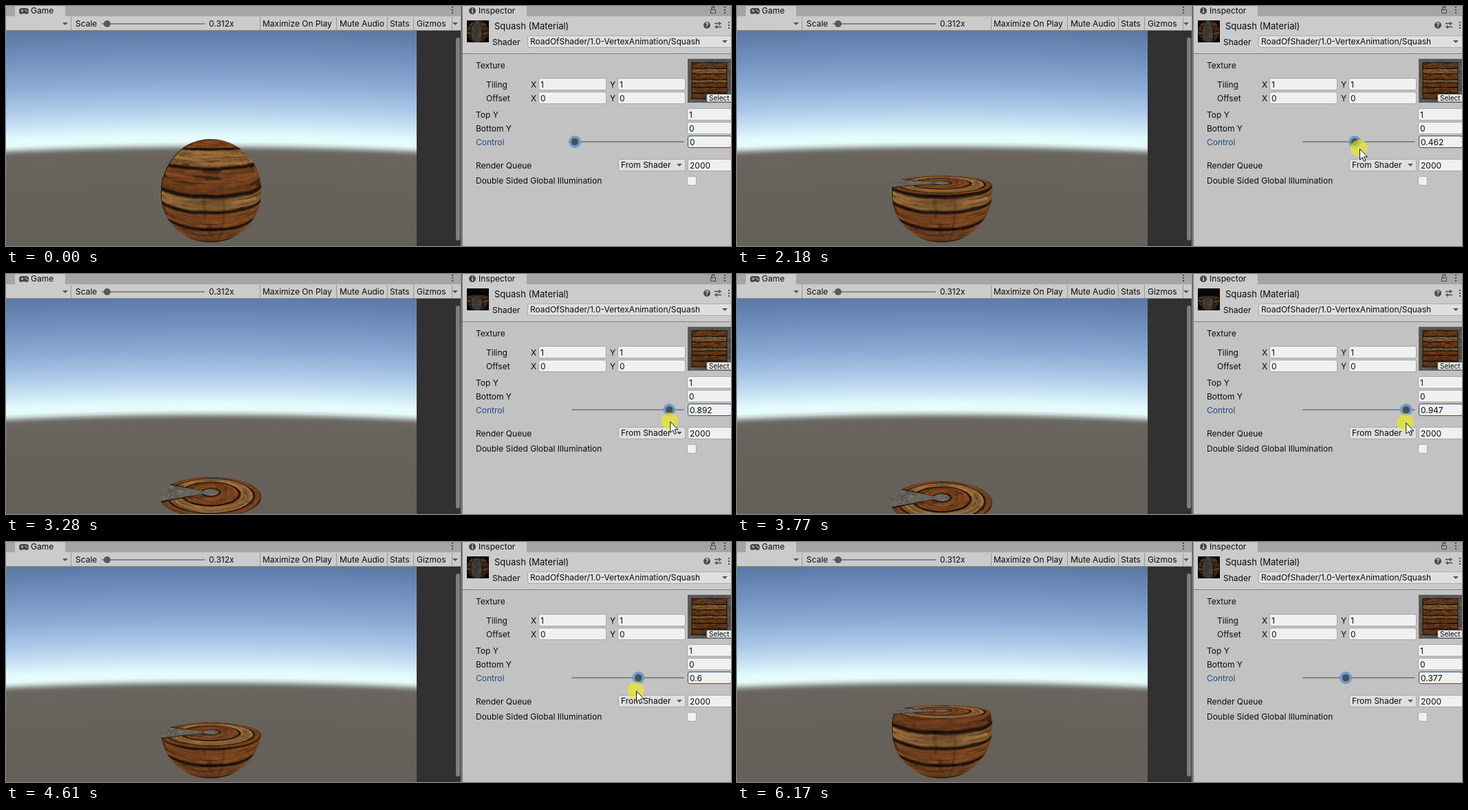
An HTML page with a canvas that plays this animation: 1054 by 350 pixels, repeating every 6950 ms.

```html
<!DOCTYPE html>
<html lang="en">
<head>
<meta charset="utf-8">
<title>Squash material</title>
<style>
html, body { margin: 0; width: 100%; height: 100%; overflow: hidden; background: #c8c8c8; }
canvas, svg { position: absolute; left: 0; top: 0; width: 1054px; height: 350px; display: block; }
text { font: 12px Inter, sans-serif; fill: #0b0b0b; white-space: pre; }
</style>
</head>
<body>
<canvas id="scene" width="1054" height="350"></canvas>
<svg id="ui" viewBox="0 0 1054 350" xmlns="http://www.w3.org/2000/svg"></svg>
<script>
const LOOP = 6950;
const ctx = document.getElementById('scene').getContext('2d');

// ---------- timing ----------
// [first change, last change, number of steps]
const bursts = [[370, 1010, 9], [1090, 1250, 3], [1410, 1410, 1], [1560, 2180, 9], [2260, 2900, 9],
  [2970, 3610, 9], [3680, 3840, 3], [3990, 4610, 9], [4690, 5080, 6], [5620, 6170, 8]];
const controlKeys = [[1560, 0], [1640, .02], [1720, .065], [2180, .462], [2260, .508], [2900, .81],
  [3280, .91], [3610, .94], [3840, .95], [3990, .942], [4140, .88], [4300, .761], [4380, .669],
  [4610, .6], [5080, .377]];
const pointerKeys = [[370, 986, 338], [690, 889, 252], [1010, 837, 203], [1250, 827, 196],
  [1410, 827, 196], [1560, 831, 197], [1640, 837, 199], [2180, 905, 208], [2900, 954, 213],
  [3280, 968, 215.5], [3840, 973, 217], [3990, 966, 218], [4300, 930, 219], [4610, 916, 217],
  [5080, 885.5, 212], [5540, 885.5, 212], [5620, 889, 218], [6090, 984, 338]];

function heldTime(t) {
  let held = 0;
  for (const [start, end, n] of bursts) {
    if (t < start) break;
    const step = n > 1 ? (end - start) / (n - 1) : 1;
    held = start + Math.min(n - 1, Math.floor((t - start) / step + 1e-6)) * step;
  }
  return held;
}

function track(keys, t) {
  if (t <= keys[0][0]) return keys[0].slice(1);
  for (let i = 1; i < keys.length; i++) {
    const a = keys[i - 1], b = keys[i];
    if (t <= b[0]) {
      const k = (t - a[0]) / (b[0] - a[0]);
      return a.slice(1).map((v, j) => v + (b[j + 1] - v) * k);
    }
  }
  return keys[keys.length - 1].slice(1);
}

// ---------- wood texture ----------
const TW = 512, TH = 256;
const texture = new Float32Array(TW * TH * 3);
const hash = (x, y) => {
  const s = Math.sin(x * 127.1 + y * 311.7) * 43758.5453;
  return s - Math.floor(s);
};
function noise(x, y) {
  const i = Math.floor(x), j = Math.floor(y);
  const smooth = f => f * f * (3 - 2 * f);
  const a = smooth(x - i), b = smooth(y - j);
  return (hash(i, j) * (1 - a) + hash(i + 1, j) * a) * (1 - b)
    + (hash(i, j + 1) * (1 - a) + hash(i + 1, j + 1) * a) * b;
}
const grooves = [.94, .797, .667, .527, .447, .34, .2, .06];
const red = [118, 66, 31], tan = [142, 99, 54], brown = [106, 62, 31];
const planks = [red, tan, red, tan, red, brown, brown];

function woodColor(u, v) {
  const side = Math.min(u, 1 - u), cap = Math.min(v, 1 - v);
  const grit = noise(u * 90, v * 60);
  if (side < .068 || cap < .055) {
    const g = .72 + .5 * noise(u * 22, v * 14) * grit + .2 * grit;
    return [112 * g, 106 * g, 97 * g];
  }
  if (side < .078 || cap < .063) return [30, 22, 15];
  const w = v + .012 * (noise(u * 9, 3) - .5) + .005 * (noise(u * 30, v * 8) - .5);
  let p = 0, gap = 1;
  grooves.forEach((g, i) => {
    if (w < g && i < planks.length) p = i;
    gap = Math.min(gap, Math.abs(w - g));
  });
  const fine = noise(u * 26, w * 170), wide = noise(u * 8 + 5, w * 55 + p);
  let k = .66 + .38 * wide + .3 * fine + .14 * (grit - .5);
  if (noise(u * 12 + 40, w * 90) < .2) k *= .62;
  if (noise(u * 60, w * 6) < .13) k *= .85;
  const edge = Math.min(1, Math.max(0, (gap - .004) / .012));
  k *= .24 + .76 * edge;
  return planks[p].map(c => c * k);
}
for (let y = 0; y < TH; y++) for (let x = 0; x < TW; x++) {
  const c = woodColor((x + .5) / TW, 1 - (y + .5) / TH);
  texture.set(c, (y * TW + x) * 3);
}

// ---------- squashed sphere, traced per pixel ----------
const EYE = .427, DIST = 2.04, R2 = .25;

function traceBall(view, top, dx, dy) {
  const rad2 = top > 0 ? R2 - top * top : R2;
  let x, y, z, hit = false;
  if (top < .5 && dy < 0 && top < EYE) {
    const t = (top - EYE) / dy;
    x = dx * t; z = t - DIST;
    const r = x * x + z * z;
    if (r <= rad2) { hit = true; y = Math.sqrt(R2 - r); }
  }
  if (!hit) {
    const a = dx * dx + dy * dy + 1, b = EYE * dy - DIST, c = EYE * EYE + DIST * DIST - R2;
    const d = b * b - a * c;
    if (d < 0) return -1;
    const t = (-b - Math.sqrt(d)) / a;
    x = dx * t; y = EYE + dy * t; z = t - DIST;
    if (y > top) return -1;
  }
  let u = (Math.atan2(z, x) - view.seam) / (2 * Math.PI);
  u -= Math.floor(u);
  const v = .5 + Math.asin(Math.max(-1, Math.min(1, y * 2))) / Math.PI;
  return (Math.min(TH - 1, Math.floor((1 - v) * TH)) * TW + Math.min(TW - 1, Math.floor(u * TW))) * 3;
}

function makeView(x, y, w, h, cx, cy, focal, seam, light) {
  const cv = document.createElement('canvas');
  cv.width = w; cv.height = h;
  return { x, y, w, h, cx, cy, focal, seam, light, cv, g: cv.getContext('2d') };
}
const gameView = makeView(220, 190, 156, 160, 297.5, 204.5, 292, Math.PI, 1);
const iconView = makeView(670, 21, 32, 32, 686, 23.5, 61, -Math.PI / 2 - .12, .6);

function drawBall(view, top) {
  const img = view.g.createImageData(view.w, view.h), S = 3;
  for (let py = 0, o = 0; py < view.h; py++) for (let px = 0; px < view.w; px++, o += 4) {
    let r = 0, g = 0, b = 0, n = 0;
    for (let s = 0; s < S * S; s++) {
      const sx = view.x + px + (s % S + .5) / S, sy = view.y + py + (Math.floor(s / S) + .5) / S;
      const i = traceBall(view, top, (sx - view.cx) / view.focal, (view.cy - sy) / view.focal);
      if (i < 0) continue;
      r += texture[i]; g += texture[i + 1]; b += texture[i + 2]; n++;
    }
    if (!n) continue;
    const k = view.light / n;
    img.data[o] = r * k; img.data[o + 1] = g * k; img.data[o + 2] = b * k;
    img.data[o + 3] = 255 * n / (S * S);
  }
  view.g.putImageData(img, 0, 0);
  ctx.drawImage(view.cv, view.x, view.y);
}

// flat view of the texture
const swatch = document.createElement('canvas');
swatch.width = 60; swatch.height = 60;
{
  const g = swatch.getContext('2d'), img = g.createImageData(60, 60);
  for (let y = 0; y < 60; y++) for (let x = 0; x < 60; x++) {
    const i = (Math.floor((y + .5) * TH / 60) * TW + Math.floor((x + .5) * TW / 60)) * 3;
    for (let c = 0; c < 3; c++) img.data[(y * 60 + x) * 4 + c] = texture[i + c] * .84;
    img.data[(y * 60 + x) * 4 + 3] = 255;
  }
  g.putImageData(img, 0, 0);
}

// ---------- backdrop ----------
const ARC = 6430;
const sky = ctx.createRadialGradient(297, 207 + ARC, ARC - 150, 297, 207 + ARC, ARC + 175);
[[-150, '#645f58'], [-60, '#66615a'], [-8, '#69645e'], [-4, '#6f6d69'], [0, '#8f9693'], [4, '#c4d3d2'],
  [9, '#e6fbfa'], [18, '#e4fbfd'], [34, '#cde6f5'], [60, '#acc9e8'], [95, '#8babd5'], [135, '#7190bf'],
  [175, '#5c79a5']].forEach(([d, c]) => sky.addColorStop((d + 150) / 325, c));

function box(x, y, w, h, color) {
  ctx.fillStyle = color;
  ctx.fillRect(x, y, w, h);
}
function paintScene(control) {
  box(0, 0, 1054, 350, '#c8c8c8');
  box(0, 0, 1054, 15, '#a5a5a5');
  box(13, 0, 73, 15, '#cbcbcb');
  box(664, 0, 93, 15, '#cbcbcb');
  box(0, 15, 662, 21, '#cbcbcb');
  box(664, 15, 390, 54, '#cbcbcb');
  box(664, 69, 390, 1, '#7f7f7f');
  box(664, 70, 390, 280, '#c2c2c2');
  box(0, 35, 662, 1, '#8f8f8f');
  box(597, 36, 65, 314, '#313131');
  box(661, 0, 3, 350, '#8a8a8a');
  box(662, 0, 1, 350, '#5e5e5e');
  box(0, 36, 597, 314, sky);
  box(670, 21, 32, 32, '#060606');
  box(991, 77, 63, 64, '#5c5c5c');
  ctx.drawImage(swatch, 992.5, 79);
  const border = 1.007 - .981 * control;
  drawBall(gameView, border - .5);
  drawBall(iconView, border);
}

// ---------- interface ----------
const text = (x, y, s, extra = '') => `<text x="${x}" y="${y}" ${extra}>${s}</text>`;
const rect = (x, y, w, h, fill, extra = '') =>
  `<rect x="${x}" y="${y}" width="${w}" height="${h}" fill="${fill}" ${extra}/>`;
const circle = (x, y, r, fill, extra = '') => `<circle cx="${x}" cy="${y}" r="${r}" fill="${fill}" ${extra}/>`;
const path = (d, extra) => `<path d="${d}" ${extra}/>`;
const field = (x, y, w, s, id = '') =>
  rect(x + .5, y + .5, w - 1, 17, '#f0f0f0', `rx="2.5" stroke="${id ? '#2c4f78' : '#a6a6a6'}"`)
  + text(x + 3, y + 14, s, id && `id="${id}"`);
const drop = (x, y, w, s, arrow) =>
  rect(x + .5, y + .5, w - 1, 17, '#dfdfdf', 'rx="2.5" stroke="#aaa"') + text(x + 4, y + 13, s)
  + triangle(arrow, y + 9);
const triangle = (x, y) => path(`M${x - 4} ${y - 2}h8l-4 4z`, 'fill="#555"');
const dots = (x, y) => [-4, 0, 4].map(d => rect(x - 1, y + d - 1, 2, 2, '#4a4a4a')).join('');
const line = 'fill="none" stroke="#4a4a4a" stroke-width="1.4"';

document.getElementById('ui').innerHTML = [
  // game tab and toolbar
  rect(19, 3, 14, 8, '#454545', 'rx="4"'), circle(22, 9.2, 2.6, '#454545'), circle(30, 9.2, 2.6, '#454545'),
  path('M21.5 7h4M23.5 5v4', 'stroke="#cbcbcb" stroke-width="1.1"'),
  circle(28.5, 6, .9, '#cbcbcb'), circle(30.5, 8, .9, '#cbcbcb'),
  text(36, 11, 'Game'), dots(649, 6),
  [94, 369, 480, 554, 592, 648].map(x => rect(x, 16, 1, 19, '#999')).join(''),
  triangle(86, 26), triangle(653, 26),
  text(101, 30, 'Scale'), rect(139, 25, 150, 2, '#868686'), circle(147, 26, 5, '#585858'),
  '<clipPath id="cut"><rect x="290" y="16" width="41" height="19"/></clipPath>',
  text(295, 30, '0.312x', 'clip-path="url(#cut)"'),
  text(373, 30, 'Maximize On Play'), text(485, 30, 'Mute Audio'), text(558, 30, 'Stats'), text(597, 30, 'Gizmos'),
  rect(654, 46, 6, 296, '#7d7d7d', 'rx="3"'),
  // inspector header
  circle(678, 7, 5, '#454545'), rect(677.3, 6, 1.6, 4, '#ddd'), rect(677.3, 3.6, 1.6, 1.5, '#ddd'),
  text(687, 11, 'Inspector'),
  rect(1024.5, 5.5, 7, 5, 'none', 'stroke="#4a4a4a"'), path('M1026 5V3a2 2 0 0 1 4 0v1', line), dots(1045, 6),
  text(710, 34, 'Squash (Material)', 'style="font-size:13px"'),
  circle(1019, 28, 5, '#4a4a4a'),
  text(1019, 31.3, '?', 'text-anchor="middle" style="font-size:9px;font-weight:700;fill:#ddd"'),
  path('M1030 25.5h10M1030 30.5h10M1037 23v5M1033 28v5', line), dots(1051, 28),
  text(707, 57, 'Shader'), drop(758, 43, 298, 'RoadOfShader/1.0-VertexAnimation/Squash', 1045),
  // properties
  text(683, 91, 'Texture'), text(698, 119, 'Tiling'), text(698, 139, 'Offset'),
  [[105, '1'], [125, '0']].map(([y, s]) => text(763, y + 14, 'X') + field(774, y, 99, s)
    + text(878, y + 14, 'Y') + field(889, y, 99, s)).join(''),
  rect(1018.5, 128.5, 40, 11.5, '#e4e4e4', 'rx="2" stroke="#555"'),
  text(1022, 138, 'Select', 'style="font-size:10px"'),
  text(683, 163, 'Top Y'), field(990, 149, 66, '1'),
  text(683, 183, 'Bottom Y'), field(990, 169, 66, '0'),
  text(683, 203, 'Control', 'style="fill:#1f4a80"'), field(991, 189, 64, '0', 'value'),
  rect(822, 197, 164, 2, '#868686', 'rx="1"'),
  '<g id="knob">' + circle(0, 198, 9, '#6f9acb') + circle(0, 198, 5.2, '#4a4f56') + '</g>',
  text(683, 237, 'Render Queue'), drop(890, 223, 98, 'From Shader', 979), field(991, 223, 66, '2000'),
  text(683, 259, 'Double Sided Global Illumination'),
  rect(990.5, 248.5, 13, 13, '#f0f0f0', 'rx="2.5" stroke="#aaa"'),
  // pointer
  '<g id="pointer">' + circle(-.5, -.5, 12.3, '#f0ee0f', 'id="press" fill-opacity=".62"')
  + path('M.5 .5V16.2L4.1 12.8 6.6 18.5 9 17.5 6.5 11.9H11.6Z',
    'fill="#fff" stroke="#111" stroke-width="1" stroke-linejoin="round"') + '</g>'
].join('');

const [value, knob, pointer, press] = ['value', 'knob', 'pointer', 'press'].map(id => document.getElementById(id));
const show = (el, on) => el.setAttribute('visibility', on ? 'visible' : 'hidden');
let painted = -1;

function render(ms) {
  const t = ms % LOOP, held = heldTime(t);
  const control = Math.round(track(controlKeys, held)[0] * 1000) / 1000;
  if (control !== painted) {
    painted = control;
    paintScene(control);
    value.textContent = String(control);
    knob.setAttribute('transform', `translate(${827 + 154 * control} 0)`);
  }
  const [x, y] = track(pointerKeys, held);
  pointer.setAttribute('transform', `translate(${x} ${y})`);
  show(pointer, t >= 370 && t < 6170);
  show(press, t >= 1410 && t < 5620);
}

const begin = performance.now();
function tick() {
  render(performance.now() - begin);
  requestAnimationFrame(tick);
}
tick();
</script>
</body>
</html>
```
